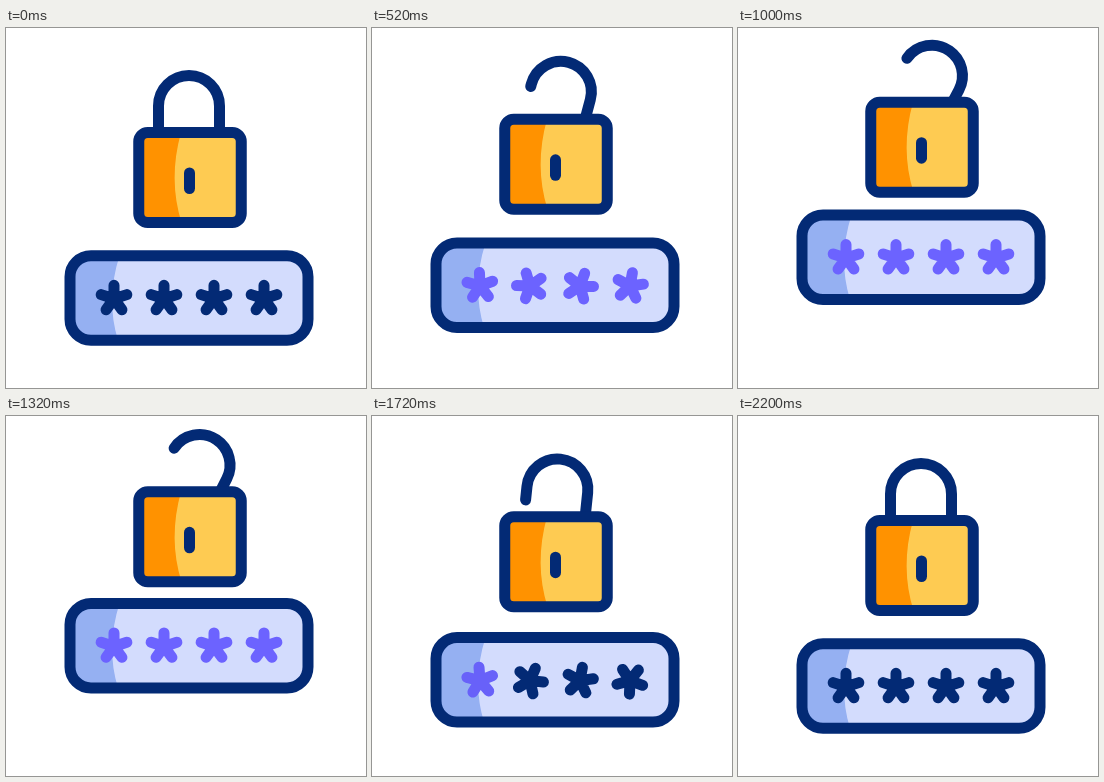
An HTML page with a canvas that plays this animation: 360 by 360 pixels, repeating every 2.48 s.

```html
<!DOCTYPE html>
<html lang="en">
<head>
<meta charset="utf-8">
<title>Password lock</title>
<style>
html, body { margin: 0; width: 100%; height: 100%; overflow: hidden; background: #fff; }
canvas { display: block; width: 360px; height: 360px; }
</style>
</head>
<body>
<canvas id="stage"></canvas>
<script>
const LOOP = 2480, STEP = 40;
const NAVY = [3, 42, 117], PURPLE = [108, 99, 255];
const canvas = document.getElementById('stage');
const ctx = canvas.getContext('2d');
const scale = window.devicePixelRatio || 1;
canvas.width = canvas.height = 360 * scale;

const rgb = c => `rgb(${c.map(Math.round).join()})`;
const clamp = x => Math.min(1, Math.max(0, x));
const span = (t, start, length) => clamp((t - start) / length);

// Ease curve with handles (x1, 0) and (x2, 1)
function ease(u, x1, x2 = 0.2) {
  let lo = 0, hi = 1;
  for (let i = 0; i < 24; i++) {
    const s = (lo + hi) / 2, r = 1 - s;
    if (3 * r * r * s * x1 + 3 * r * s * s * x2 + s * s * s < u) lo = s;
    else hi = s;
  }
  return lo * lo * (3 - 2 * lo);
}

// Rounded panel, split by a bowed line into a dark left and a light right part
function panel(x, y, w, h, radius, light, dark, split) {
  ctx.beginPath();
  ctx.roundRect(x, y, w, h, radius);
  ctx.fillStyle = light;
  ctx.fill();
  ctx.save();
  ctx.clip();
  ctx.beginPath();
  ctx.moveTo(x, y);
  ctx.lineTo(split[0], y);
  ctx.quadraticCurveTo(split[1], y + h * 0.52, split[2], y + h);
  ctx.lineTo(x, y + h);
  ctx.fillStyle = dark;
  ctx.fill();
  ctx.restore();
  ctx.beginPath();
  ctx.roundRect(x, y, w, h, radius);
  ctx.stroke();
}

function shackle(p) {
  const q = Math.pow(p, 0.75), r = 30.5;
  const turn = 28 * q * Math.PI / 180;
  const start = (-45 + 130 * q - 50 * q * q) * Math.PI / 180 - turn;
  ctx.save();
  ctx.translate(183 + 11 * q, 78 - 4 * q * (1 - q));
  ctx.rotate(turn);
  ctx.beginPath();
  if (start < 0) ctx.moveTo(-r, -start * r);
  ctx.arc(0, 0, r, Math.PI + Math.max(0, start), Math.PI * 2);
  ctx.lineTo(r, 28);
  ctx.stroke();
  ctx.restore();
}

function lock(p) {
  ctx.save();
  ctx.translate(0, -30.5 * p);
  shackle(p);
  panel(132.75, 104.5, 102.5, 90, 9, '#fecb52', '#ff9200', [175, 162, 175.5]);
  ctx.beginPath();
  ctx.moveTo(183.5, 145);
  ctx.lineTo(183.5, 160.5);
  ctx.stroke();
  ctx.restore();
}

function star(i, t) {
  const open = span(t, 20 + 85 * i, 560);
  const close = span(t, 1550 - 70 * i, 600);
  const turn = Math.PI * 2 * (ease(open, 0.5) - ease(close, 0.5));
  const tint = span(open, 0.28, 0.08) - span(close, 0.28, 0.08);
  ctx.save();
  ctx.translate(108 + 50 * i, 270.8);
  ctx.rotate(turn);
  ctx.strokeStyle = rgb(NAVY.map((c, k) => c + (PURPLE[k] - c) * tint));
  ctx.beginPath();
  for (let k = 0; k < 5; k++) {
    const a = Math.PI * (0.4 * k - 0.5);
    ctx.moveTo(0, 0);
    ctx.lineTo(13.5 * Math.cos(a), 13.5 * Math.sin(a));
  }
  ctx.stroke();
  ctx.restore();
}

function field(t) {
  const rise = ease(span(t, 135, 1050), 0.6) - ease(span(t, 1185, 895), 0.6);
  ctx.save();
  ctx.translate(0, -41.5 * rise);
  panel(64, 227.75, 238, 84.5, 21, '#d3dcfd', '#95b0f2', [113.5, 99.5, 112]);
  for (let i = 0; i < 4; i++) star(i, t);
  ctx.restore();
}

function draw(t) {
  ctx.setTransform(scale, 0, 0, scale, 0, 0);
  ctx.fillStyle = '#fff';
  ctx.fillRect(0, 0, 360, 360);
  ctx.lineWidth = 11;
  ctx.lineCap = ctx.lineJoin = 'round';
  ctx.strokeStyle = rgb(NAVY);
  lock(ease(span(t, 185, 920), 0.5) - ease(span(t, 1160, 920), 0.5));
  field(t);
}

const begin = performance.now();
function tick() {
  const t = (performance.now() - begin) % LOOP;
  draw(Math.floor(t / STEP) * STEP);
  requestAnimationFrame(tick);
}
tick();
</script>
</body>
</html>
```
